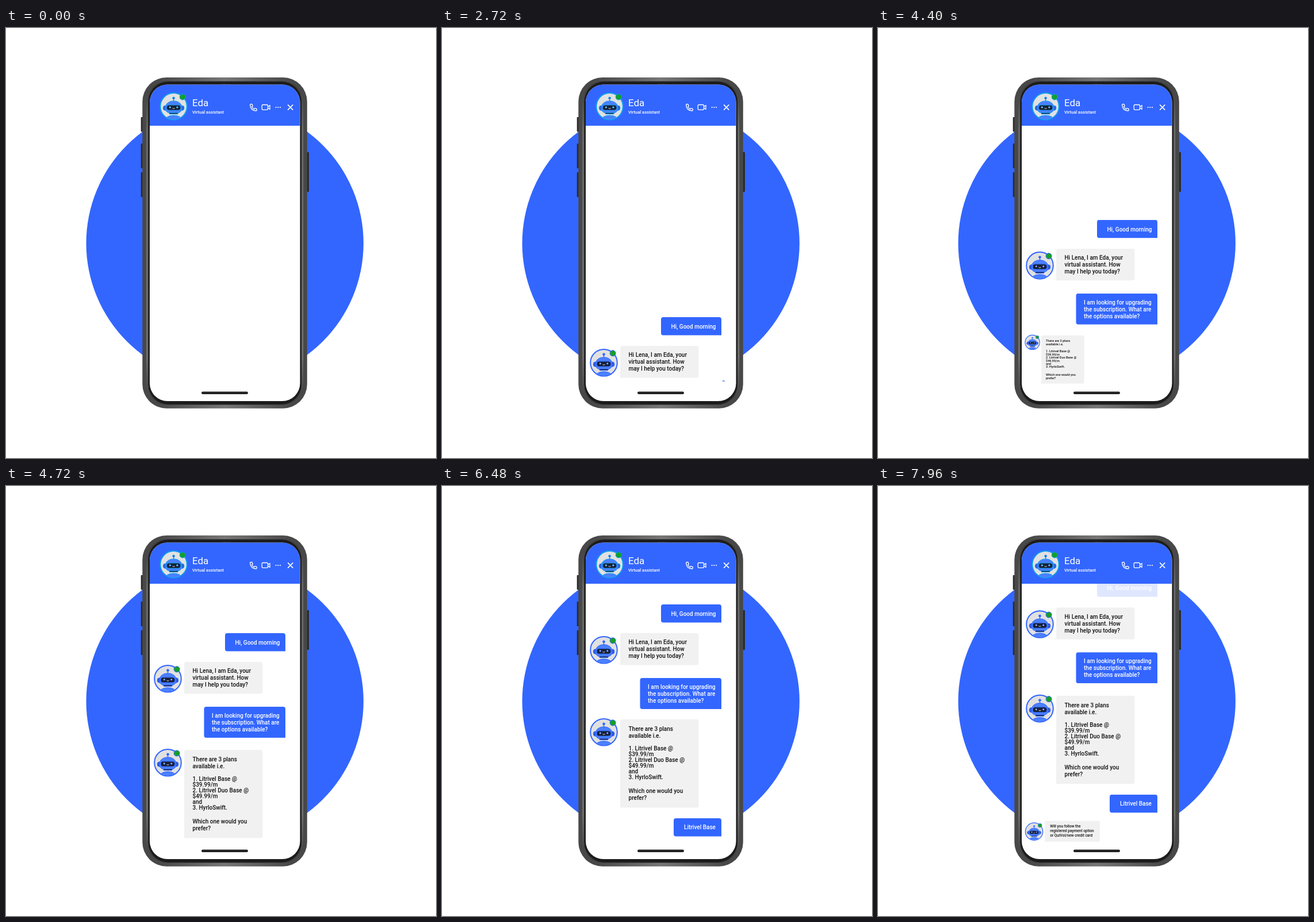
An HTML page without scripts that plays this animation: 748x748 px, repeating every 8 s.

```html
<!DOCTYPE html>
<html lang="en">
<head>
<meta charset="utf-8">
<title>Chat on a phone</title>
<style>
  html, body { margin: 0; width: 100%; height: 100%; overflow: hidden; background: #fff; }
  svg { display: block; width: 100vw; height: 100vh; }
  text { font: 500 10px Roboto, sans-serif; }
  .me { fill: #36f; }
  .bot { fill: #f1f1f1; }
  .me + text { fill: #fff; }
  .bot + text { fill: #111; }
  .line { fill: none; stroke: #fff; stroke-width: 1.3; stroke-linecap: round; stroke-linejoin: round; }

  .pop, .lift, .fade { animation: 8s cubic-bezier(.3333, 0, .6667, 1) infinite both; }
  .fade { animation-timing-function: linear; animation-name: fade; }

  /* a message grows from a corner */
  .pop1 { animation-name: pop1; transform-origin: 492px 238px; }
  .pop2 { animation-name: pop2; transform-origin: 253px 311px; }
  .pop3 { animation-name: pop3; transform-origin: 492px 393.3px; }
  .pop4 { animation-name: pop4; transform-origin: 253px 572.7px; }
  .pop5 { animation-name: pop5; transform-origin: 492px 611.5px; }
  .pop6 { animation-name: pop6; transform-origin: 253px 622px; }
  @keyframes pop1 { 0% { transform: scale(0) } 5%, to { transform: scale(1) } }
  @keyframes pop2 { 0%, 16% { transform: scale(0) } 21%, to { transform: scale(1) } }
  @keyframes pop3 { 0%, 33.5% { transform: scale(0) } 38.5%, to { transform: scale(1) } }
  @keyframes pop4 { 0%, 50.5% { transform: scale(0) } 59%, to { transform: scale(1) } }
  @keyframes pop5 { 0%, 76% { transform: scale(0) } 81%, to { transform: scale(1) } }
  @keyframes pop6 {
    0% { transform: scale(0) }
    96.5% { transform: scale(0); animation-timing-function: cubic-bezier(.3333, 0, .6667, .625) }
    to { transform: scale(.784) }
  }

  /* older messages make room, --d is the distance */
  .lift2 { animation-name: lift2; --d: 68.8px; }
  .lift3 { animation-name: lift3; --d: 77.5px; }
  .lift4 { animation-name: lift4; --d: 171.8px; }
  .lift5 { animation-name: lift5; --d: 49.9px; }
  .lift6 { animation-name: lift6; --d: -53.9px; }
  .late.lift5 { --d: 53px; }
  .late.lift6 { --d: -49.6px; }
  @keyframes lift2 { 0%, 16% { transform: translateY(var(--d)) } 21%, to { transform: translateY(0) } }
  @keyframes lift3 { 0%, 33.5% { transform: translateY(var(--d)) } 38.5%, to { transform: translateY(0) } }
  @keyframes lift4 { 0%, 50.5% { transform: translateY(var(--d)) } 59%, to { transform: translateY(0) } }
  @keyframes lift5 { 0%, 76% { transform: translateY(var(--d)) } 81%, to { transform: translateY(0) } }
  @keyframes lift6 {
    0% { transform: translateY(0) }
    96.5% { transform: translateY(0); animation-timing-function: cubic-bezier(.3333, 0, .6667, .625) }
    to { transform: translateY(var(--d)) }
  }
  @keyframes fade { 0%, 96.5% { opacity: 1 } to { opacity: .02 } }
</style>
</head>
<body>
<svg viewBox="0 0 748 748">
  <defs>
    <linearGradient id="rim">
      <stop offset=".1" stop-color="#484848"/>
      <stop offset=".5" stop-color="#767676"/>
      <stop offset=".9" stop-color="#484848"/>
    </linearGradient>
    <linearGradient id="edge" x2="0" y2="1">
      <stop offset="0" stop-color="#3a3a3a"/>
      <stop offset=".15" stop-color="#666"/>
      <stop offset=".85" stop-color="#6c6c6c"/>
      <stop offset="1" stop-color="#3a3a3a"/>
    </linearGradient>
    <clipPath id="screen"><rect x="250" y="98.5" width="261.5" height="550.5" rx="31"/></clipPath>
    <clipPath id="disc"><circle r="22.5"/></clipPath>
    <g id="robot">
      <circle r="23.3" fill="#e1e1e1" stroke-width="2"/>
      <g clip-path="url(#disc)">
        <path d="M0-14v6" stroke="#36f" stroke-width="1.3"/>
        <circle cy="-14.5" r="1.9" fill="#36f"/>
        <rect x="-18.3" y="-1.5" width="36.6" height="8.5" rx="4" fill="#2b58e0"/>
        <path d="M-14.5 4C-15-5-8-9.5 0-9.5S15-5 14.5 4C14 9 10 11.5 6 11.5H-6C-10 11.5-14 9-14.5 4z" fill="#4a80ff"/>
        <rect x="-12.3" y="-2.3" width="24.6" height="9" rx="4" fill="#172033"/>
        <circle cx="-6.3" cy="1.6" r="1.3" fill="#fff"/>
        <circle cx="6.3" cy="1.6" r="1.3" fill="#fff"/>
        <path d="M-2 3q2 2 4 0" fill="none" stroke="#fff" stroke-width=".9"/>
        <rect x="-7.5" y="11" width="15" height="2.3" rx=".8" fill="#172033"/>
        <ellipse cy="23" rx="14" ry="7.5" fill="#4a80ff"/>
      </g>
      <circle cx="15.6" cy="-16.4" r="5" fill="#14a021"/>
    </g>
  </defs>

  <circle cx="380.7" cy="374.5" r="241.2" fill="#36f"/>

  <g fill="#2b2b2b">
    <rect x="234.7" y="155" width="5" height="25.5" rx="1"/>
    <rect x="234.7" y="201" width="5" height="43" rx="1"/>
    <rect x="234.7" y="251" width="5" height="43" rx="1"/>
    <rect x="521" y="216" width="6" height="69" rx="1"/>
  </g>
  <rect x="237.3" y="86" width="286.5" height="575.7" rx="42" fill="url(#rim)"/>
  <rect x="243.8" y="92.5" width="273.6" height="563" rx="37" fill="url(#edge)"/>
  <rect x="247.3" y="93.3" width="266.8" height="561.4" rx="35" fill="#1c1c1c"/>

  <g clip-path="url(#screen)">
    <path d="M250 98h262v552H250z" fill="#fff"/>

    <g class="lift lift6"><g class="lift lift5"><g class="lift lift4">
      <g class="lift lift3">
        <g class="lift lift2"><g class="pop pop1"><g class="fade">
          <path class="me" d="M381 210a4 4 0 0 1 4-4h97a4 4 0 0 1 4 4v27.5H385a4 4 0 0 1-4-4z"/>
          <text x="398.5" y="226">Hi, Good morning</text>
        </g></g></g>
        <g class="pop pop2">
          <use href="#robot" x="281.5" y="285.3" stroke="#36f"/>
          <path class="bot" d="M310 260a4 4 0 0 1 4-4h128.500a4 4 0 0 1 4 4v47.500a4 4 0 0 1-4 4H310z"/>
          <text><tspan x="324.500" y="275.300">Hi Lena, I am Eda, your</tspan><tspan x="324.500" dy="12">virtual assistant. How</tspan><tspan x="324.500" dy="12">may I help you today?</tspan></text>
        </g>
      </g>
      <g class="pop pop3">
        <path class="me" d="M344.500 338a4 4 0 0 1 4-4h133.500a4 4 0 0 1 4 4v50H348.500a4 4 0 0 1-4-4z"/>
        <text><tspan x="358" y="352.700">I am looking for upgrading</tspan><tspan x="358" dy="12">the subscription. What are</tspan><tspan x="358" dy="12">the options available?</tspan></text>
      </g>
    </g></g></g>

    <g class="lift late lift6">
      <g class="lift late lift5"><g class="pop pop4">
        <use href="#robot" x="281.5" y="428.3" stroke="#36f"/>
        <path class="bot" d="M310 410a4 4 0 0 1 4-4h128.500a4 4 0 0 1 4 4v145.500a4 4 0 0 1-4 4H310z"/>
        <text><tspan x="324.500" y="426">There are 3 plans</tspan><tspan x="324.500" dy="12">available i.e.</tspan><tspan x="324.500" dy="22">1. Litrivel Base @</tspan><tspan x="324.500" dy="10">$39.99/m</tspan><tspan x="324.500" dy="10">2. Litrivel Duo Base @</tspan><tspan x="324.500" dy="10">$49.99/m</tspan><tspan x="324.500" dy="10">and</tspan><tspan x="324.500" dy="10">3. HyrloSwift.</tspan><tspan x="324.500" dy="24">Which one would you</tspan><tspan x="324.500" dy="12">prefer?</tspan></text>
      </g></g>
      <g class="pop pop5">
        <path class="me" d="M403 582a4 4 0 0 1 4-4h75a4 4 0 0 1 4 4v27.500H407a4 4 0 0 1-4-4z"/>
        <text x="476" y="597.300" text-anchor="end">Litrivel Base</text>
      </g>
    </g>

    <g class="pop pop6">
      <use href="#robot" x="281.5" y="590" stroke="#36f"/>
      <path class="bot" d="M310 565.500a4 4 0 0 1 4-4h139a4 4 0 0 1 4 4v47.500a4 4 0 0 1-4 4H310z"/>
      <text><tspan x="324" y="579.500">Will you follow the</tspan><tspan x="324" dy="12">registered payment option</tspan><tspan x="324" dy="12">or QuiVol/new credit card</tspan></text>
    </g>

    <path d="M250 98h262v72H250z" fill="#36f"/>
    <use href="#robot" x="291.6" y="136.4" stroke="#0f9bee"/>
    <g fill="#fff">
      <text x="324" y="136" style="font-size:17px;font-weight:400">Eda</text>
      <text x="324" y="149" style="font-size:7.5px">Virtual assistant</text>
      <circle cx="469.600" cy="138" r="1.100"/>
      <circle cx="473.300" cy="138" r="1.100"/>
      <circle cx="477" cy="138" r="1.100"/>
    </g>
    <g class="line">
      <path d="M426 132.500h2l1.200 3.200-1.600 1.400c.9 2 2 3.100 4 4l1.400-1.600 3.200 1.200v2c0 .8-.6 1.300-1.400 1.300-6-.3-9.800-4.200-10.200-10.100 0-.8.6-1.400 1.400-1.400z"/>
      <rect x="445.200" y="133.500" width="10.300" height="8.800" rx="2"/>
      <path d="M455.500 137l3.500-2.500v7l-3.500-2.500"/>
      <path d="M490.600 133.900l8.200 8.200m0-8.200l-8.200 8.200" stroke-width="1.600"/>
    </g>
    <rect x="340" y="632.500" width="81" height="4.500" rx="2.200" fill="#222"/>
  </g>
  <path d="M376 97.500h15" stroke="#444" stroke-dasharray="1.500 2.500"/>
</svg>
</body>
</html>
```
